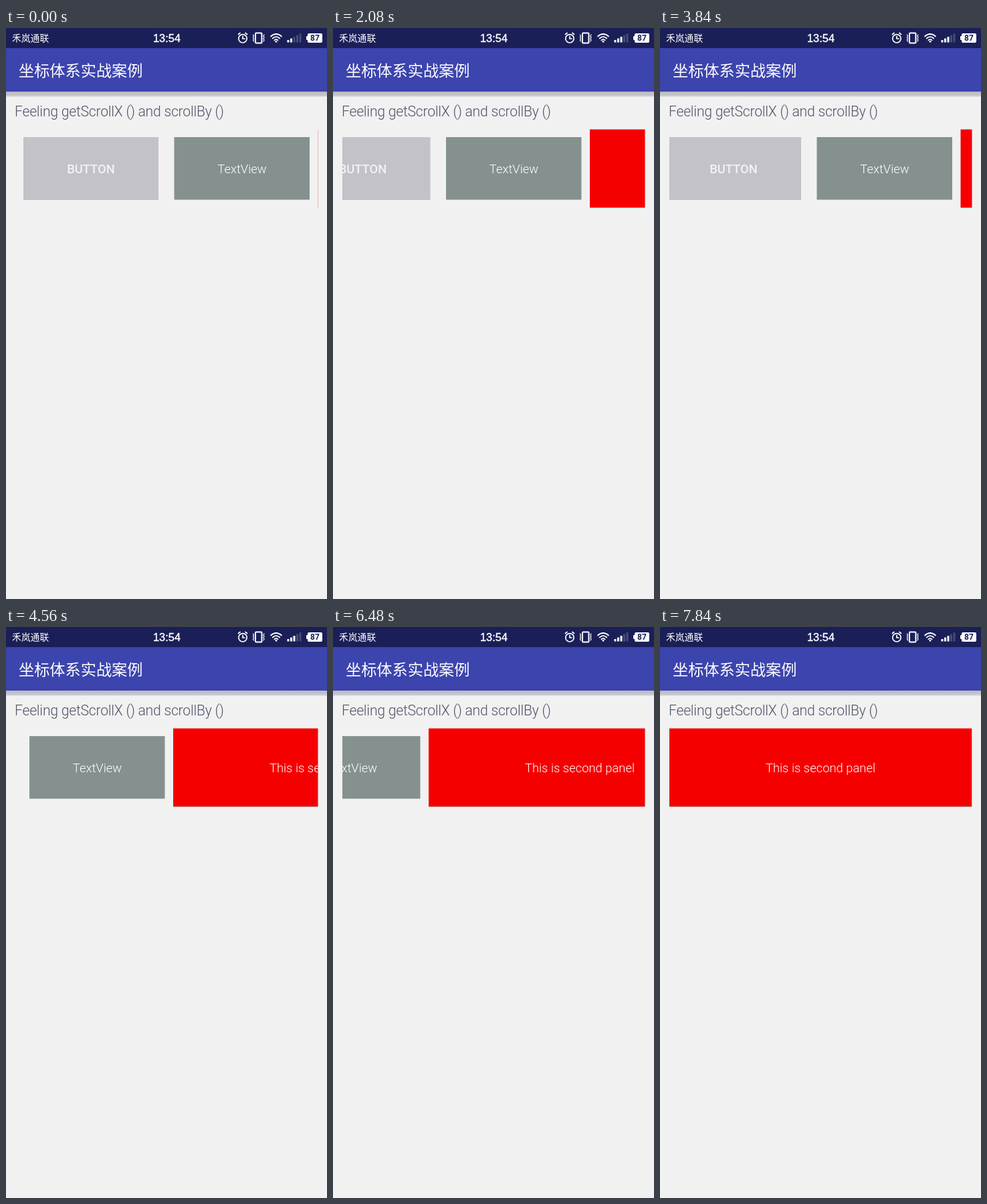
Write an HTML page that moves like this. It is 480 by 853 pixels and loops after 8000 ms.

```html
<!DOCTYPE html>
<html lang="zh-CN">
<head>
<meta charset="utf-8">
<style>
  html, body { margin: 0; height: 100%; overflow: hidden; background: #f1f1f1; }
  svg { display: block; }
  text { fill: #fff; font-family: Roboto, "Noto Sans", sans-serif; }
  .zh { font-family: "Noto Sans CJK SC", "Noto Sans CJK", sans-serif; }
  .view { font-size: 18.4px; font-weight: 300; text-anchor: middle; }
  .line { fill: none; stroke: #fff; stroke-width: 1.7; stroke-linecap: round; }
</style>
</head>
<body>
<svg width="100%" height="100%" viewBox="0 0 480 853">
  <defs>
    <linearGradient id="shadow" x2="0" y2="1">
      <stop offset="0" stop-color="#b9b9c2"/>
      <stop offset=".75" stop-color="#c7c7cd"/>
      <stop offset="1" stop-color="#e9e9eb"/>
    </linearGradient>
  </defs>
  <rect width="480" height="853" fill="#f1f1f1"/>
  <rect y="95" width="480" height="8" fill="url(#shadow)"/>
  <rect y="30" width="480" height="65" fill="#3c44ad"/>
  <rect width="480" height="30" fill="#1a1f57"/>

  <!-- status bar -->
  <text class="zh" x="9" y="20" font-size="13.8" font-weight="500">禾岚通联</text>
  <text x="240.5" y="21" font-size="16.4" text-anchor="middle" stroke="#fff" stroke-width=".4"
        style="font-family: 'Liberation Sans', sans-serif">13:54</text>
  <g class="line">
    <circle cx="354" cy="15.8" r="6.2"/>
    <path d="M354 12.5v3.5h3M347.5 9.5l2.5-2M360.5 9.5l-2.5-2"/>
    <rect x="373" y="7.5" width="9.5" height="15" rx="1" stroke-width="2"/>
    <path stroke-width="1.2" d="M369.5 10l1 2-1 2 1 2-1 2 1 2M386 10l-1 2 1 2-1 2 1 2-1 2"/>
    <path d="M396 12.5q8-7 16 0M398.7 15.5q5.3-4.6 10.6 0M401.3 18.3q2.7-2.2 5.4 0"/>
  </g>
  <circle cx="404" cy="20.3" r="1.4" fill="#fff"/>
  <g id="signal" fill="#fff"></g>
  <rect x="451" y="8" width="22" height="14" rx="2" fill="#fff"/>
  <rect x="449" y="12" width="3" height="6" rx="1" fill="#fff"/>
  <text x="462" y="19.3" font-size="12" font-weight="700" text-anchor="middle" style="fill:#1a1f57">87</text>

  <text class="zh" x="19" y="71.5" font-size="23.2" font-weight="300">坐标体系实战案例</text>
  <text x="13" y="132" font-size="21.2" font-weight="300" letter-spacing="-.25" style="fill:#52566a">Feeling getScrollX () and scrollBy ()</text>

  <!-- scrolling viewport -->
  <svg x="14" y="151" width="452.5" height="118" viewBox="14 151 452.5 118">
    <g id="panels">
      <rect x="26" y="163" width="202" height="94" fill="#c2c2c8"/>
      <text class="view" x="127" y="217" style="font-weight:500;fill:#f2f2f4">BUTTON</text>
      <rect x="251.5" y="163" width="202.5" height="93.5" fill="#84918f"/>
      <text class="view" x="353" y="217">TextView</text>
      <rect x="466.5" y="268" width="452.5" height="1" fill="#a3a3a3"/>
      <rect x="466.5" y="151.5" width="452.5" height="116.5" fill="#f50000"/>
      <text class="view" x="692.5" y="217">This is second panel</text>
    </g>
  </svg>
</svg>
<script>
const LOOP = 8000, STEP = 80, PAGE = 452.5;
const panels = document.getElementById('panels');
const signal = document.getElementById('signal');

// [time in ms, scroll offset in px]
const drag = [
  [0, 0], [1680, 0], [1840, 22], [2080, 82.5], [2560, 168], [2720, 170], [3040, 120], [3360, 0],
  [3760, 0], [3840, 17], [4080, 82], [4320, 155], [4560, 216.5], [4800, 233],
  [5680, 256], [6400, 297], [6560, 350], [6720, 418], [6960, PAGE],
  [7360, PAGE], [7600, 412], [7840, PAGE], [LOOP, PAGE]
];

function scrollAt(t) {
  const i = drag.findIndex(([time]) => time > t);
  const [t0, x0] = drag[i - 1], [t1, x1] = drag[i];
  return x0 + (x1 - x0) * (t - t0) / (t1 - t0);
}

const bars = Array.from({ length: 5 }, (_, i) => {
  const bar = document.createElementNS('http://www.w3.org/2000/svg', 'rect');
  const height = 3.5 + i * 2.4;
  const attrs = { x: 420.5 + i * 4.5, y: 21.5 - height, width: 3, height };
  for (const name in attrs) bar.setAttribute(name, attrs[name]);
  return signal.appendChild(bar);
});

function draw(now) {
  const t = Math.floor(now % LOOP / STEP) * STEP;
  panels.setAttribute('transform', `translate(${-scrollAt(t)} 0)`);
  const lit = t < 1280 ? 2 : 3;
  bars.forEach((bar, i) => bar.setAttribute('opacity', i < lit ? 1 : .2));
  requestAnimationFrame(() => draw(performance.now()));
}
draw(performance.now());
</script>
</body>
</html>
```
